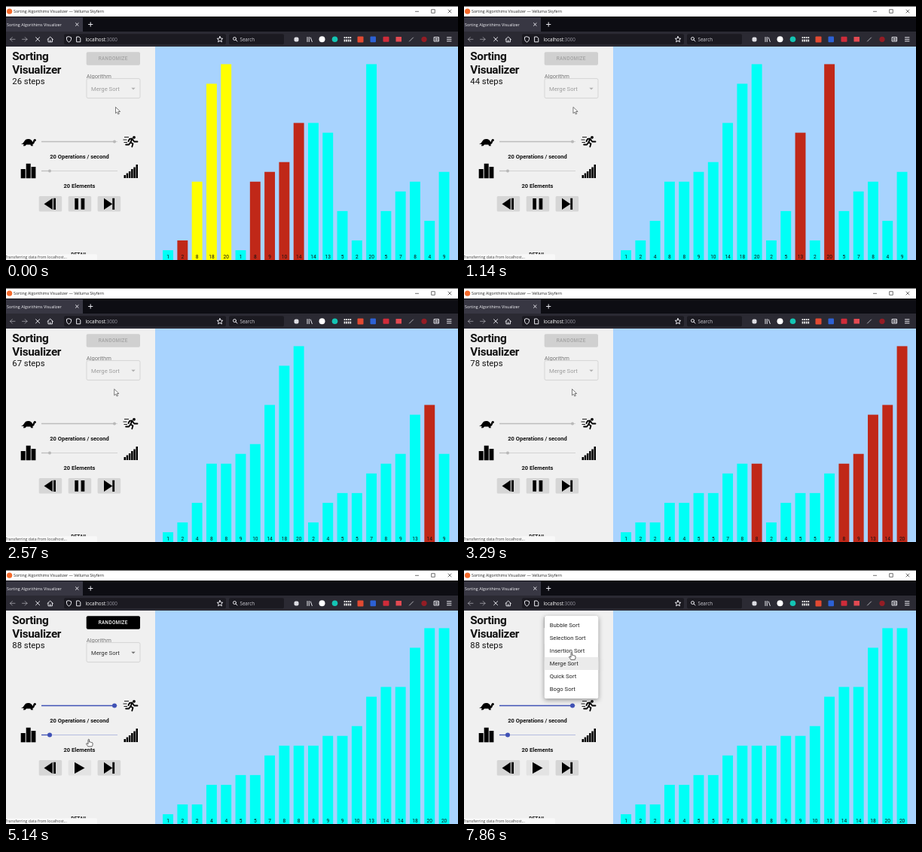
An HTML page for the animation above (8 s loop, 600 by 338 pixels).

```html
<!DOCTYPE html>
<html lang="en">
<head>
<meta charset="utf-8">
<title>Sorting Visualizer</title>
<style>
html, body { margin: 0; width: 100%; height: 100%; overflow: hidden; }
svg { display: block; width: 100%; height: 100%; cursor: default; user-select: none; }
text { font-family: Roboto, sans-serif; white-space: pre; }
.ui { font-family: "Open Sans", "Noto Sans", sans-serif; }
.mid { text-anchor: middle; }
.line { fill: none; stroke: #e8e8ee; stroke-width: 1; stroke-linecap: round; stroke-linejoin: round; }
#menu { filter: drop-shadow(0 2px 3px rgba(0, 0, 0, .4)); }
</style>
</head>
<body>
<svg id="stage" viewBox="0 0 600 338">
  <rect width="600" height="338" fill="#f0f0f0"/>
  <rect x="198" y="54" width="402" height="284" fill="#a8d3fe"/>
  <g id="bars"></g>

  <!-- window chrome -->
  <rect width="600" height="14" fill="#fff"/>
  <rect width="600" height=".8" fill="#333"/>
  <circle cx="4.6" cy="7.2" r="3.6" fill="#f4692a"/>
  <text class="ui" x="10" y="9.2" font-size="5.3" fill="#222">Sorting Algorithims Visualizer — Velluma Skyfern</text>
  <path d="M543 7.3h5M564.700 4.700h4.600v4.600h-4.600zM586.700 4.700l4.600 4.600m0-4.600l-4.600 4.600" fill="none" stroke="#333" stroke-width=".7"/>
  <rect y="14" width="600" height="20" fill="#0d0d13"/>
  <rect y="15" width="102" height="19" fill="#383743"/>
  <text class="ui" x="1" y="26.600" font-size="5.350" fill="#f4f4f8">Sorting Algorithims Visualizer</text>
  <path class="line" stroke-width=".8" d="M92.500 22.700l3.600 3.600m0-3.600l-3.600 3.600M109.500 24.500h5.400m-2.700-2.700v5.400"/>
  <rect y="34" width="600" height="20" fill="#2b2a33"/>
  <rect x="77" y="37.300" width="215" height="14" rx="2" fill="#1b1a21"/>
  <rect x="296" y="37.300" width="73" height="14" rx="2" fill="#1b1a21"/>
  <path class="line" stroke-opacity=".5" d="M12 44.300H5.500m2.800-2.800l-2.800 2.800l2.800 2.800M21.500 44.300h6.500m-2.800-2.800l2.800 2.800l-2.800 2.800"/>
  <path class="line" d="M39.600 41.700l5 5m0-5l-5 5M55 44.500l3.700-3.400l3.700 3.400M56 44v3.800h5.400V44M58.700 47.600v-2"/>
  <path class="line" d="M83.500 40.800l3 1v2.500q-.3 2.600-3 3.800q-2.700-1.200-3-3.800v-2.500zM94 41h3l1.800 1.800v5H94z" stroke-width=".8"/>
  <path class="line" stroke-width=".7" d="M284 40.500l1.100 2.500l2.700.3l-2 1.800l.6 2.700l-2.400-1.400l-2.400 1.400l.6-2.700l-2-1.800l2.700-.3z"/>
  <text class="ui" x="105.500" y="46.800" font-size="6.300" fill="#fff">localhost<tspan fill="#96959f">:3000</tspan></text>
  <circle class="line" cx="303.500" cy="43.500" r="2"/>
  <path class="line" d="M305 45l2 2"/>
  <text class="ui" x="310.500" y="46.700" font-size="6.200" fill="#cfcfd6">Search</text>
  <rect x="382.500" y="41.500" width="6" height="6" rx="2" fill="#dcdce2"/>
  <path class="line" d="M400 41.500v6M402.300 41.500v6M404.300 42l2 5.500"/>
  <circle cx="419.500" cy="44.300" r="4" fill="#fff"/>
  <circle cx="436.500" cy="44.300" r="3.800" fill="#14c5b4"/>
  <path d="M449.500 43v-2m2.600 2v-2m2.600 2v-2m2.600 2v-2M449.500 47.500v-3m2.600 3v-3m2.600 3v-3m2.600 3v-3" stroke="#eee" stroke-width="1.700"/>
  <rect x="466.500" y="40.500" width="8" height="8" rx="1" fill="#e24a32"/>
  <rect x="483.500" y="40.500" width="7.500" height="7.800" rx="1" fill="#2d61d4"/>
  <rect x="500.500" y="40.800" width="8" height="7" rx="1" fill="#cf2c3a"/>
  <rect x="517.500" y="41" width="7.500" height="6.500" fill="#e24a52"/>
  <path class="line" stroke-opacity=".7" d="M535.500 47l5-5"/>
  <circle cx="555" cy="44.300" r="3.600" fill="#941d25"/>
  <path class="line" d="M568.500 41.500h6v5.500h-6zM570 43.500h3m-3 1.700h3" stroke-width=".8"/>
  <path class="line" d="M585.500 41.800h5.500m-5.500 2.500h5.500m-5.500 2.500h5.500"/>

  <!-- side panel -->
  <g font-size="15.300" font-weight="700" letter-spacing="-.36" fill="#111">
    <text x="8.300" y="72">Sorting</text>
    <text x="8.300" y="89.800">Visualizer</text>
  </g>
  <text id="steps" x="8.300" y="104.300" font-size="11.300" fill="#111"></text>
  <rect id="random" x="106.700" y="61.300" width="71.300" height="17.500" rx="2"/>
  <text id="randomText" class="mid" x="142.200" y="72.400" font-size="6.400" font-weight="500" letter-spacing=".3">RANDOMIZE</text>
  <text x="106.700" y="95.600" font-size="7.600" fill="#777">Algorithm</text>
  <rect x="107" y="96.600" width="71" height="26" rx="2" fill="none" stroke="#cbcbcb" stroke-width=".7"/>
  <text id="choice" x="113" y="112.800" font-size="7.700">Merge Sort</text>
  <path id="caret" d="M166.300 108.800h5.400l-2.700 2.700z"/>

  <g id="sliders"></g>
  <g class="mid" font-size="7.500" font-weight="700" fill="#111">
    <text x="97.500" y="202.500">20 Operations / second</text>
    <text x="97.500" y="241.700">20 Elements</text>
    <text x="97" y="332.500" font-size="6.600">DETAIL</text>
  </g>
  <path d="M20 183.500q3-.6 4-3q2-3.800 6-3.400q4 .3 5.200 4q1-.6 1.200-2.500q.5-1.800 2.300-1.500q1.500.5 1.200 2q-.3 1-1.600 1.200q-.5 3-3 3.900l.6 2h-2.700l-.8-1.700h-5.400l-1.600 1.700h-2.500l.8-2.200z"/>
  <circle cx="170" cy="174.800" r="1.900"/>
  <path d="M162.500 180l1.500-3.200l3.600-.3l-2.300 5l3.200 1.800l-1.200 4M165.300 181.500l-2.200 3h-4M167.500 176.800l2.700 3.700h4.300" fill="none" stroke="#000" stroke-width="1.800" stroke-linecap="round" stroke-linejoin="round"/>
  <path d="M157 174.500h6M155.500 178h5M156.500 181.500h4.500" stroke="#000" stroke-width=".9"/>
  <path d="M19.700 217h6v12.200h-6zM26.700 209.700h6v19.500h-6zM33.600 214h5.800v15.200h-5.800z"/>
  <g id="steepIcon"></g>
  <g fill="#d6d6d6">
    <rect x="43.700" y="253" width="30.500" height="20.500" rx="1.500"/>
    <rect id="playBox" x="82.700" y="253" width="30.500" height="20.500" rx="1.500"/>
    <rect x="121.600" y="253" width="30.500" height="20.500" rx="1.500"/>
  </g>
  <path d="M61.800 255.800v15.200l-11.300-7.600zM63 255.800h3v15.200h-3zM130 255.800v15.200l11.300-7.600zM141.300 255.800h2.800v15.200h-2.800z"/>
  <path id="playIcon"/>
  <path d="M0 330.200h119.500q1.500 0 1.500 1.500V338H0z" fill="#f8f8f8"/>
  <text class="ui" x="-1" y="336.200" font-size="5.200" fill="#444">Transferring data from localhost...</text>

  <g id="menu">
    <rect x="106.700" y="61" width="71.600" height="110" rx="2" fill="#fff"/>
    <rect x="106.700" y="116" width="71.600" height="17" fill="#ebebeb"/>
  </g>
  <path id="arrow" d="M0 0v8.300l2-1.800l1.300 3l1.500-.6l-1.300-2.900h2.700z" fill="#fff" stroke="#444" stroke-width=".7"/>
  <path id="hand" d="M0 .8q.8-1.300 1.600 0v3.300q1-.7 1.500.2q1-.6 1.500.3q1.300-.3 1.400.8v2q0 1.200-.8 2.400H-.2q-.8-1.500-2.300-3.300q.2-1.300 1.300-.7L0 6.700z" fill="#fff" stroke="#222" stroke-width=".7"/>
</svg>
<script>
const $ = id => document.getElementById(id);
const LOOP = 8000, FPS = 7, STEP_MS = 63.2, START = 26;
const CYAN = '#00fff6', RED = '#c02818', YELLOW = '#ffff00', BLUE = '#3f51b5';

function add(parent, tag, attrs, content) {
  const el = document.createElementNS(stage.namespaceURI, tag);
  set(el, attrs);
  if (content) el.textContent = content;
  return parent.appendChild(el);
}
function set(el, attrs) {
  for (const key in attrs) el.setAttribute(key, attrs[key]);
}
const stage = $('stage');

// Merge sort, one snapshot per write
const values = [2, 4, 8, 18, 20, 1, 8, 9, 10, 14, 14, 13, 5, 2, 20, 5, 7, 8, 4, 9];
const log = [];
function sort(lo, hi) {
  if (lo >= hi) return;
  const mid = (lo + hi) >> 1;
  sort(lo, mid);
  sort(mid + 1, hi);
  const left = values.slice(lo, mid + 1), right = values.slice(mid + 1, hi + 1);
  for (let k = lo, i = 0, j = 0; k <= hi; k++) {
    const takeLeft = j >= right.length || (i < left.length && left[i] <= right[j]);
    values[k] = takeLeft ? left[i++] : right[j++];
    const next = mid + 1 + j;
    log.push(values.map((v, n) => ({
      v,
      color: n === k || (n >= next && n <= hi) ? RED : n > k && n <= mid ? YELLOW : CYAN
    })));
  }
}
sort(0, values.length - 1);

const bars = values.map((_, i) => {
  const x = 208.1 + 19.29 * i;
  return {
    rect: add($('bars'), 'rect', { x, width: 13.9 }),
    label: add($('bars'), 'text', { class: 'mid', x: x + 7, y: 336, 'font-size': 6.6, fill: '#111' })
  };
});

const sliders = [[180.5, 144], [219.5, 58]].map(([y, x]) => ({
  rail: add($('sliders'), 'path', { d: `M47 ${y}H148`, 'stroke-width': 1 }),
  track: add($('sliders'), 'path', { d: `M47 ${y}H${x}`, 'stroke-width': 1.3 }),
  thumb: add($('sliders'), 'circle', { cx: x, cy: y })
}));

for (let i = 0; i < 6; i++) {
  const h = [4, 6.5, 9, 12, 14.5, 18][i];
  add($('steepIcon'), 'rect', { x: 156.5 + i * 3.2, y: 229 - h, width: 2.5, height: h });
}
['Bubble', 'Selection', 'Insertion', 'Merge', 'Quick', 'Bogo'].forEach((name, i) =>
  add($('menu'), 'text', { x: 113.8, y: 76.3 + 17 * i, 'font-size': 7.7, fill: '#222' }, name + ' Sort'));

// Pointer path: time, x, y
const path = [
  [0, 145.5, 134.5], [3290, 143.5, 134.5], [4150, 143.5, 134.5], [5000, 109, 225],
  [5300, 109, 225], [5950, 145, 112], [6250, 145, 112], [6800, 147, 142],
  [7150, 147, 142], [7800, 142, 109.5], [8000, 142, 109.5]
];
function pointer(t) {
  const n = path.findIndex(p => p[0] > t);
  const [t0, x0, y0] = path[n - 1], [t1, x1, y1] = path[n];
  const u = (t - t0) / (t1 - t0), e = u * u * (3 - 2 * u);
  return [x0 + (x1 - x0) * e, y0 + (y1 - y0) * e];
}
const show = (el, on) => set(el, { display: on ? 'inline' : 'none' });

function render(t) {
  const step = Math.min(log.length, START + Math.floor(t / STEP_MS + 0.4));
  const done = step === log.length;
  $('steps').textContent = step + ' steps';
  log[step - 1].forEach(({ v, color }, i) => {
    const h = 13.03 * v;
    set(bars[i].rect, { y: 338 - h, height: h, fill: done ? CYAN : color });
    bars[i].label.textContent = v;
  });

  set($('random'), { fill: done ? '#000' : '#d0d0d0' });
  set($('randomText'), { fill: done ? '#fff' : '#a3a3a3' });
  set($('choice'), { fill: done ? '#2c2c2c' : '#9c9c9c' });
  set($('caret'), { fill: done ? '#757575' : '#b0b0b0' });
  for (const { rail, track, thumb } of sliders) {
    set(rail, { stroke: done ? '#b5bce0' : '#d2d2d2' });
    set(track, { stroke: done ? BLUE : '#bdbdbd' });
    set(thumb, { fill: done ? BLUE : '#b8b8b8', r: done ? 3 : 2 });
  }
  set($('playBox'), { fill: done ? '#e3e3e3' : '#d6d6d6' });
  set($('playIcon'), {
    d: done ? 'M91 255.800v15.200l13.500-7.600z' : 'M91.300 256h4.700v14.800h-4.700zM99.600 256h4.700v14.800h-4.700z'
  });

  show($('menu'), t >= 6100);
  const [x, y] = pointer(t), hand = t > 4550;
  show($('arrow'), !hand);
  show($('hand'), hand);
  set($(hand ? 'hand' : 'arrow'), { transform: `translate(${x} ${y})` });
}

const begin = performance.now();
function tick() {
  const t = (performance.now() - begin) % LOOP;
  const n = Math.floor((t + 5) * FPS / 1000) % (LOOP * FPS / 1000);
  render(n * 1000 / FPS);
  requestAnimationFrame(tick);
}
tick();
</script>
</body>
</html>
```
